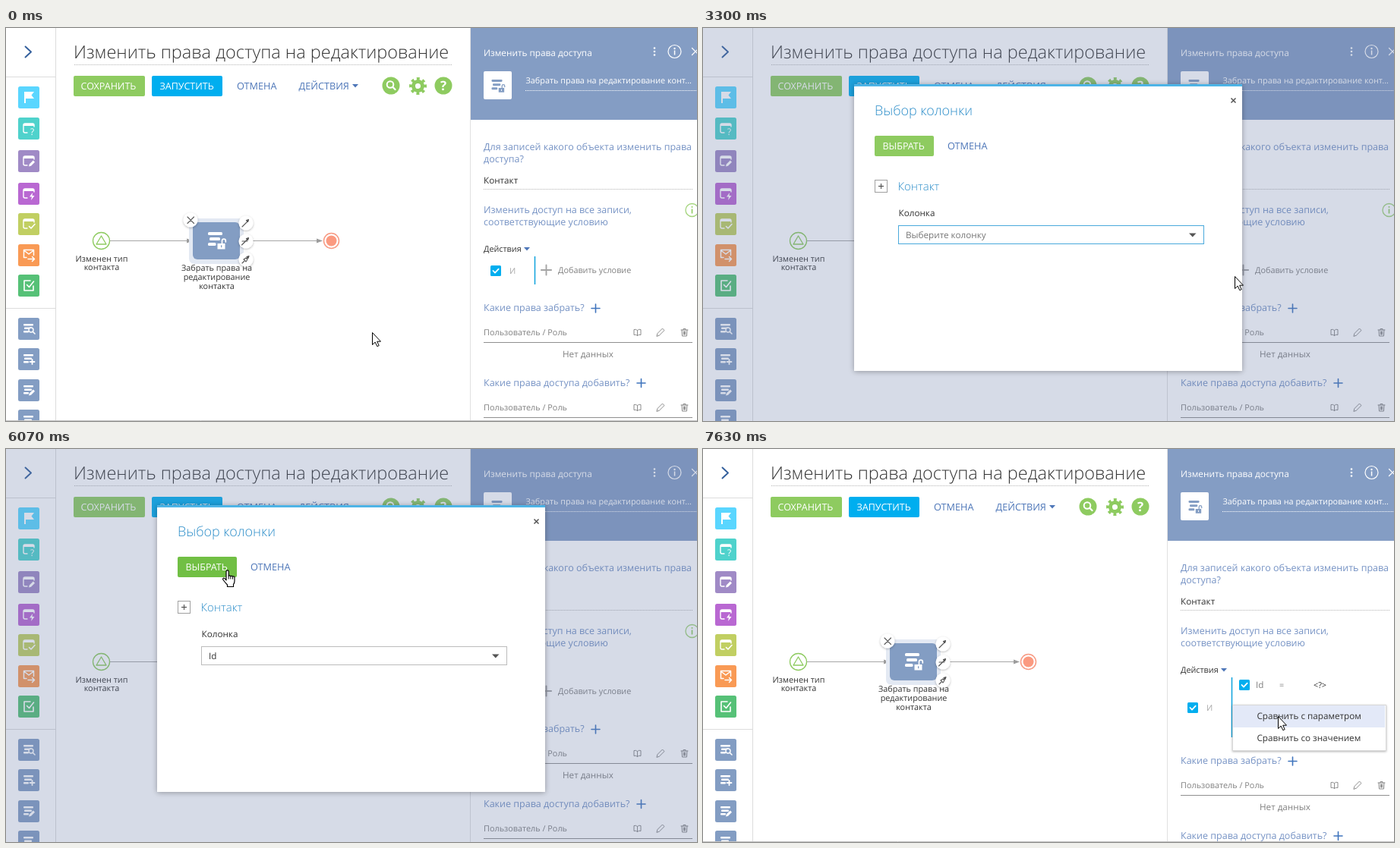
An HTML page that plays this animation: 910x518 px, repeating every 8000 ms.

```html
<!DOCTYPE html>
<html lang="ru">
<head>
<meta charset="utf-8">
<title>Изменить права доступа</title>
<style>
html, body { margin: 0; width: 100%; height: 100%; overflow: hidden; background: #fff; }
svg { display: block; width: 910px; height: 518px; }
text { font-family: "Open Sans", "Noto Sans", sans-serif; text-rendering: geometricPrecision; white-space: pre; }

.title { font-size: 23.5px; font-weight: 300; fill: #333; }
.btn { font-size: 12.7px; }
.btn.white { font-size: 12.5px; font-weight: 500; }
.label { font-size: 12.5px; fill: #7592c4; }
.mid { font-size: 11.7px; fill: #333; }
.small { font-size: 10.85px; }
.center { text-anchor: middle; }
.grey { fill: #808080; }
.pale { fill: #a8a8a8; }
.dark { fill: #333; }
.white { fill: #fff; }
.link { fill: #4d76b8; }
.ln { fill: none; stroke-linecap: round; stroke-linejoin: round; }
.dots { stroke-dasharray: 1 1; }

/* all states share one 8 s clock */
.cursor, .shift, .t { animation: 8s step-end infinite; }
.cursor { animation-name: travel; }
.shift { animation-name: shift; }
.before { animation-name: before; }
.after { animation-name: after; }
.dialog { animation-name: dialog; }
.page { animation-name: page; }
.hoverlink { animation-name: hoverlink; }
.hint { animation-name: hint; }
.value { animation-name: value; }
.list { animation-name: list; }
.focus { animation-name: focus; }
.press { animation-name: press; }
.pick { animation-name: pick; }
.arrow { animation-name: arrow; }
.hand { animation-name: hand; }

@keyframes before { 0% { opacity: 1 } 77.875%, 100% { opacity: 0 } }
@keyframes after { 0% { opacity: 0 } 77.875%, 100% { opacity: 1 } }
@keyframes shift { 0% { transform: none } 77.875%, 100% { transform: translateY(42px) } }
@keyframes dialog { 0%, 77.875%, 100% { opacity: 0 } 41.25% { opacity: 1 } }
@keyframes page { 0%, 77.875%, 100% { opacity: 1 } 41.25% { opacity: 0 } }
@keyframes hoverlink { 0%, 41.25%, 100% { opacity: 0 } 19% { opacity: 1 } }
@keyframes hint { 0% { opacity: 1 } 49%, 100% { opacity: 0 } }
@keyframes value { 0% { opacity: 0 } 49%, 100% { opacity: 1 } }
@keyframes list { 0%, 55.5%, 100% { opacity: 0 } 49% { opacity: 1 } }
@keyframes focus { 0% { stroke: #4aa9dc } 75.875%, 100% { stroke: #bcbcbc } }
@keyframes press { 0% { fill: #8ecb60 } 69.156%, 100% { fill: #71bf44 } }
@keyframes pick { 0% { opacity: 0 } 91.475%, 100% { opacity: 1 } }
@keyframes arrow {
  0%, 41.25%, 55.5%, 77.875%, 100% { opacity: 1 }
  19%, 49%, 69.156% { opacity: 0 }
}
@keyframes hand {
  0%, 41.25%, 55.5%, 77.875%, 100% { opacity: 0 }
  19%, 49%, 69.156% { opacity: 1 }
}
@keyframes travel {
  0% { transform: translate(482px, 401px) }
  9.375% { transform: translate(505px, 393px) }
  11.375% { transform: translate(505px, 393px); animation-timing-function: steps(6, start) }
  17.094% { transform: translate(688px, 341px); animation-timing-function: steps(3, start) }
  19.953% { transform: translate(734px, 328px) }
  25.875% { transform: translate(736px, 323px) }
  41.25% { transform: translate(700px, 327px) }
  43.25% { transform: translate(700px, 327px); animation-timing-function: steps(3, start) }
  46.063% { transform: translate(578px, 313px) }
  62.375% { transform: translate(578px, 313px); animation-timing-function: steps(6, start) }
  68.188% { transform: translate(330px, 182px); animation-timing-function: steps(3, start) }
  71.094% { transform: translate(286px, 159px) }
  77.875% { transform: translate(290px, 159px) }
  78.85% { transform: translate(290px, 159px); animation-timing-function: steps(10, start) }
  88.55% { transform: translate(602px, 345px); animation-timing-function: steps(3, start) }
  91.475% { transform: translate(690px, 350px); animation-timing-function: steps(5, start) }
  96.36%, 100% { transform: translate(757px, 352px) }
}
</style>
</head>
<body>
<svg viewBox="0 0 910 518">
<defs>
  <filter id="soft" x="-20%" y="-20%" width="140%" height="150%">
    <feDropShadow dx="0" dy="1" stdDeviation="1.5" flood-color="#000" flood-opacity=".3"/>
  </filter>
  <filter id="wide" x="-10%" y="-10%" width="120%" height="120%">
    <feDropShadow dx="0" dy="1" stdDeviation="3.5" flood-color="#000" flood-opacity=".32"/>
  </filter>
  <rect id="tile" width="28" height="29" rx="2.5"/>
  <g id="win">
    <path class="ln" stroke="#fff" stroke-width="1.4" d="M12 20H9a2 2 0 0 1-2-2V10a2 2 0 0 1 2-2h10a2 2 0 0 1 2 2v2"/>
    <path fill="#fff" d="M7 8h14v3H7z"/>
  </g>
  <g id="rows" fill="#fff">
    <rect x="7" y="8" width="13" height="2.6" rx="1"/>
    <rect x="8" y="12.5" width="10" height="2.6" rx="1"/>
    <rect x="7" y="17" width="7" height="2.6" rx="1"/>
  </g>
  <g id="lock">
    <rect width="19" height="4" rx="1.5"/>
    <rect x="2" y="7" width="14" height="4" rx="1.5"/>
    <rect y="14" width="10.5" height="4" rx="1.5"/>
    <path fill-rule="evenodd" d="M12.500 15h10v7.500h-10zM17 17.200h1.300v3H17z"/>
    <path class="ln" stroke="currentColor" stroke-width="1.7" d="M18.500 15v-3.500a2.400 2.400 0 0 1 4.800 0v1.500"/>
  </g>
  <path id="plus" class="ln" stroke-width="1.6" d="M-5.500 0h11M0-5.500v11"/>
  <g id="check">
    <rect width="14" height="14" rx="1.5" fill="#00aeef"/>
    <path class="ln" stroke="#fff" stroke-width="1.8" d="M3.500 7l2.500 2.700 4.700-5"/>
  </g>
  <circle id="knob" r="9.5" fill="#fff" filter="url(#soft)"/>
  <g id="grid">
    <text x="629" y="405" class="small grey">Пользователь / Роль</text>
    <g class="ln" stroke="#8b8b8b" stroke-width="1">
      <path d="M831.500 398.500q-2-2-4.500-1v7q2.500-1 4.500 1 2-2 4.500-1v-7q-2.500-1-4.500 1v7"/>
      <path d="M857 406l1-3.500 6.500-6.500 2.500 2.500-6.500 6.500z"/>
      <path d="M889 398h9M892 398v-1.500h3v1.500M890 398l.5 8h6l.5-8M892.300 400v4M893.500 400v4M894.800 400v4"/>
    </g>
    <path d="M629 414.500h275" stroke="#8f8f8f"/>
  </g>
</defs>

<rect width="910" height="518" fill="#fff"/>

<!-- sidebar -->
<path d="M65.500 0v518M0 64.500h65M0 369.500h65" stroke="#dcdcdc"/>
<path class="ln" stroke="#335f9c" stroke-width="1.900" d="M25.500 24.500l7.500 7-7.500 7"/>
<g transform="translate(16 77)">
  <use href="#tile" fill="#5ad6ff"/>
  <path fill="#fff" d="M8 7h13l-3.500 4.500L21 16H10v6H8z"/>
</g>
<g transform="translate(16 118)">
  <use href="#tile" fill="#4fd2cc"/><use href="#win"/>
  <text x="16" y="23" font-size="12" class="white">?</text>
</g>
<g transform="translate(16 161)">
  <use href="#tile" fill="#a08ac6"/><use href="#win"/>
  <path fill="#fff" d="M14 21.500l.8-3 5-5 2.200 2.200-5 5z"/>
</g>
<g transform="translate(16 204)">
  <use href="#tile" fill="#b968d2"/><use href="#win"/>
  <path fill="#fff" d="M19 13l-4 5.500h3l-1 4.500 4.500-6h-3z"/>
</g>
<g transform="translate(16 244)">
  <use href="#tile" fill="#c1cf62"/><use href="#win"/>
  <path class="ln" stroke="#fff" stroke-width="1.6" d="M14.500 17.500l2.500 2.500 5-5.500"/>
</g>
<g transform="translate(16 285)">
  <use href="#tile" fill="#f99a55"/>
  <path class="ln" stroke="#fff" stroke-width="1.500" d="M11 17.500H7.500v-10h13v7M7.500 8l6.500 5 6.500-5M13 19.500h8M18.500 16.500l3 3-3 3"/>
</g>
<g transform="translate(16 325)">
  <use href="#tile" fill="#56c177"/>
  <path class="ln" stroke="#fff" stroke-width="1.600" d="M20 15v6H8V8h8M11.500 13.500l3 3 6-7.500"/>
</g>
<g fill="#839dc3">
  <g transform="translate(16 382)">
    <use href="#tile"/><use href="#rows"/>
    <circle cx="17" cy="16" r="3" stroke="#fff" stroke-width="1.4"/>
    <path class="ln" stroke="#fff" stroke-width="1.600" d="M19.500 18.500l2.500 2.500"/>
  </g>
  <g transform="translate(16 422)">
    <use href="#tile"/><use href="#rows"/>
    <path class="ln" stroke="#fff" stroke-width="1.800" d="M15.500 18h6M18.500 15v6"/>
  </g>
  <g transform="translate(16 463)">
    <use href="#tile"/><use href="#rows"/>
    <path fill="#fff" d="M14 21.500l.8-3 5-5 2.200 2.200-5 5z"/>
  </g>
  <g transform="translate(16 503)"><use href="#tile"/><use href="#rows"/></g>
</g>

<!-- title and toolbar -->
<text x="89" y="40" class="title">Изменить права доступа на редактирование</text>
<path class="dots" d="M90 48.500h498" stroke="#b5b5b5"/>
<rect x="89" y="63" width="94" height="27" rx="2" fill="#8ecb60"/>
<rect x="192" y="63" width="93" height="27" rx="2" fill="#00aeef"/>
<text x="98.500" y="81" class="btn white">СОХРАНИТЬ</text>
<text x="202.500" y="81" class="btn white">ЗАПУСТИТЬ</text>
<text x="304" y="81" class="btn link">ОТМЕНА</text>
<text x="385.500" y="81" class="btn link">ДЕЙСТВИЯ</text>
<path class="link" d="M456 74h8l-4 4.500z"/>
<g fill="#8ecb60">
  <circle cx="507" cy="76" r="11.500"/>
  <circle cx="576" cy="76" r="11.500"/>
  <g fill="none" stroke="#8ecb60" transform="translate(542.500 76.500) rotate(-11.250)">
    <circle r="6" stroke-width="5"/>
    <circle r="9.500" stroke-width="4" stroke-dasharray="3.730 3.730"/>
  </g>
</g>
<circle cx="506" cy="74.500" r="4.300" fill="none" stroke="#fff" stroke-width="2"/>
<path class="ln" stroke="#fff" stroke-width="2.200" d="M509.500 78l3 3"/>
<text x="576" y="82" class="center white" font-size="17" font-weight="700">?</text>

<!-- diagram -->
<path d="M137 280.500h103M323 280.500h88" stroke="#a6a6a6"/>
<path d="M238 277.500l8 3-8 3zM409 277.500l8 3-8 3z" fill="#9c9c9c"/>
<circle cx="125.500" cy="280.500" r="11" fill="#fff" stroke="#8ecb60" stroke-width="1.300"/>
<path class="ln" stroke="#8ecb60" stroke-width="1.300" d="M125.500 274l6.500 11h-13z"/>
<circle cx="428.500" cy="280.500" r="10" fill="#fff" stroke="#f79a83" stroke-width="1.500"/>
<circle cx="428.500" cy="280.500" r="7" fill="#fb9a80"/>
<rect x="241" y="251" width="72" height="60" rx="7" fill="#e3e9f3"/>
<rect x="246" y="256" width="62" height="49" rx="6" fill="#839dc3"/>
<use href="#lock" x="266" y="269" fill="#fff" color="#fff"/>
<use href="#knob" x="243" y="253"/>
<use href="#knob" x="316" y="257"/>
<use href="#knob" x="316" y="281"/>
<use href="#knob" x="316" y="305"/>
<g class="ln" stroke="#555" stroke-width="1.100">
  <path d="M239 249l8.500 8.500M247.500 249l-8.500 8.500"/>
  <path d="M311 262l8-8M310.500 286l8.500-8.500M311 281h7M311 310l2.500-2.500M313 305l3 3 2-3-2-2zM317 304l2-2"/>
  <path fill="#555" d="M316.500 253.500l3-1-1 3zM316.500 277.500l3-1-1 3zM317 301.500l3-1-1 3z"/>
</g>
<g class="small dark center">
  <text x="126" y="308">Изменен тип</text>
  <text x="126" y="319">контакта</text>
  <text x="277.500" y="320">Забрать права на</text>
  <text x="277.500" y="332">редактирование</text>
  <text x="277.500" y="344">контакта</text>
</g>

<!-- properties panel -->
<path d="M611.500 0v518" stroke="#e0e0e0"/>
<rect x="612" width="298" height="121" fill="#849dc4"/>
<text x="629" y="37" class="white" font-size="11.800">Изменить права доступа</text>
<g class="white">
  <circle cx="854" cy="26.500" r="1.300"/><circle cx="854" cy="31" r="1.300"/><circle cx="854" cy="35.500" r="1.300"/>
  <circle cx="880.500" cy="27" r="1.200"/>
  <rect x="879.800" y="29.500" width="1.500" height="6"/>
</g>
<circle cx="880.500" cy="31" r="8.500" fill="none" stroke="#fff" stroke-width="1.200"/>
<path class="ln" stroke="#fff" stroke-width="1.200" d="M903.500 26.500l9 9M903.500 35.500l9-9"/>
<rect x="629" y="57" width="37" height="37" rx="2" fill="#fff"/>
<use href="#lock" transform="translate(639.500 68) scale(.74)" fill="#839dc3" color="#839dc3"/>
<text x="684.500" y="73" class="small white">Забрать права на редактирование конт...</text>
<path class="dots" d="M684 82.500h226" stroke="#fff"/>

<text x="629" y="161" class="label">Для записей какого объекта изменить права</text>
<text x="629" y="177" class="label">доступа?</text>
<text x="629" y="205" class="mid">Контакт</text>
<path class="dots" d="M629 212.500h275" stroke="#b5b5b5"/>
<text x="629" y="244" class="label">Изменить доступ на все записи,</text>
<text x="629" y="260" class="label">соответствующие условию</text>
<text x="629" y="295" class="small dark">Действия</text>
<path d="M682 289h8l-4 4.500z" fill="#4d76b8"/>

<g class="t before">
  <circle cx="903.500" cy="240" r="8.500" fill="none" stroke="#a3d47c" stroke-width="1.300"/>
  <path d="M902.700 238.500h1.600v6h-1.600zM902.700 235h1.600v1.700h-1.600z" fill="#8ecb60"/>
  <use href="#check" x="638" y="313"/>
  <text x="663" y="324" class="small pale">И</text>
  <path d="M696.500 301v37" stroke="#0da2dc" stroke-width="1.500"/>
  <use href="#plus" transform="translate(711.500 319) scale(1.200)" stroke="#a5a5a5" stroke-width="1"/>
  <text x="727" y="323" class="small grey">Добавить условие</text>
  <g class="t hoverlink">
    <rect x="725" y="312" width="101" height="15" fill="#fff"/>
    <text x="727" y="323" class="small" fill="#1f86d6">Добавить условие</text>
  </g>
</g>

<g class="shift">
  <text x="629" y="373" class="label">Какие права забрать?</text>
  <use href="#plus" x="776.500" y="369.500" stroke="#3f74bd"/>
  <use href="#grid"/>
  <text x="733" y="434" class="mid grey" style="fill:#808080">Нет данных</text>
  <text x="629" y="472" class="label">Какие права доступа добавить?</text>
  <use href="#plus" x="836.500" y="468" stroke="#3f74bd"/>
  <use href="#grid" y="99"/>
</g>

<g class="t after">
  <use href="#check" x="706" y="304"/>
  <text x="728" y="315" class="mid grey">Id</text>
  <text x="759" y="315" class="small grey">=</text>
  <text x="804" y="315" class="small dark">&lt;?&gt;</text>
  <use href="#check" x="638" y="334"/>
  <text x="663" y="345" class="small pale">И</text>
  <path d="M696.500 301v79" stroke="#0da2dc" stroke-width="1.500"/>
  <rect x="697.500" y="337.500" width="202" height="60" fill="#fff" stroke="#d8d8d8" filter="url(#soft)"/>
  <rect class="t pick" x="698" y="338" width="200" height="29" fill="#e3e9f8"/>
  <text x="729.500" y="356" class="mid">Сравнить с параметром</text>
  <text x="729.500" y="385" class="mid">Сравнить со значением</text>
</g>

<path class="t page" d="M0 517.500h910" stroke="#c4c4c4"/>

<!-- column dialog -->
<g class="t dialog">
  <rect width="910" height="518" fill="#687aa5" opacity=".27"/>
  <rect x="199" y="74" width="511" height="378" fill="#fff" filter="url(#wide)"/>
  <rect x="199" y="74" width="511" height="3" fill="#4db4e6"/>
  <path d="M695.500 92.500l6 6M701.500 92.500l-6 6" stroke="#555" stroke-width="1.500"/>
  <text x="226" y="115" font-size="17.950" font-weight="300" fill="#2f8fca">Выбор колонки</text>
  <rect class="t press" x="226" y="142" width="78" height="27" rx="2"/>
  <text x="236.500" y="160" class="btn white">ВЫБРАТЬ</text>
  <text x="322" y="160" class="btn link">ОТМЕНА</text>
  <rect x="226.500" y="200.500" width="16" height="16" fill="#fff" stroke="#a0a0a0"/>
  <path d="M231 208.500h7M234.500 205v7" stroke="#444"/>
  <text x="256.500" y="214" font-size="15" font-weight="300" fill="#2f8fca">Контакт</text>
  <text x="257.500" y="248" class="mid">Колонка</text>
  <rect class="t focus" x="257.500" y="260.500" width="402" height="24" fill="#fff"/>
  <path d="M640 270.500h9.500l-4.750 5z" fill="#555"/>
  <text x="267" y="277" class="mid t hint" style="fill:#777">Выберите колонку</text>
  <text x="267" y="277" class="mid t value">Id</text>
  <g class="t list">
    <rect x="258.500" y="286.500" width="401" height="32" fill="#fff" stroke="#d8d8d8"/>
    <rect x="259" y="288" width="400" height="29" fill="#e3e9f8"/>
    <text x="267" y="307" class="mid">Id</text>
  </g>
</g>

<g class="cursor" fill="#fff" stroke="#000" stroke-linejoin="round">
  <path class="t arrow" d="M.5.5v16l3.700-3.400 2.600 5.600 2.400-1.100-2.500-5.400h4.800z"/>
  <g class="t hand" transform="translate(-1)">
    <path stroke-width="1.200" d="M5 14V2.500a1.500 1.500 0 0 1 3.200 0V8.500a1.500 1.500 0 0 1 2.700.3 1.500 1.500 0 0 1 2.600.6 1.400 1.400 0 0 1 2.500 1.100V15q0 2.500-1.500 4.500V22.500H6.500V20Q4 17.500 1 13.500q-1-2 .8-2.500 1.400 0 3.200 3z"/>
    <path d="M8.200 8.500v4M10.900 9v3.500M13.500 9.600v3"/>
  </g>
</g>
</svg>
</body>
</html>
```
